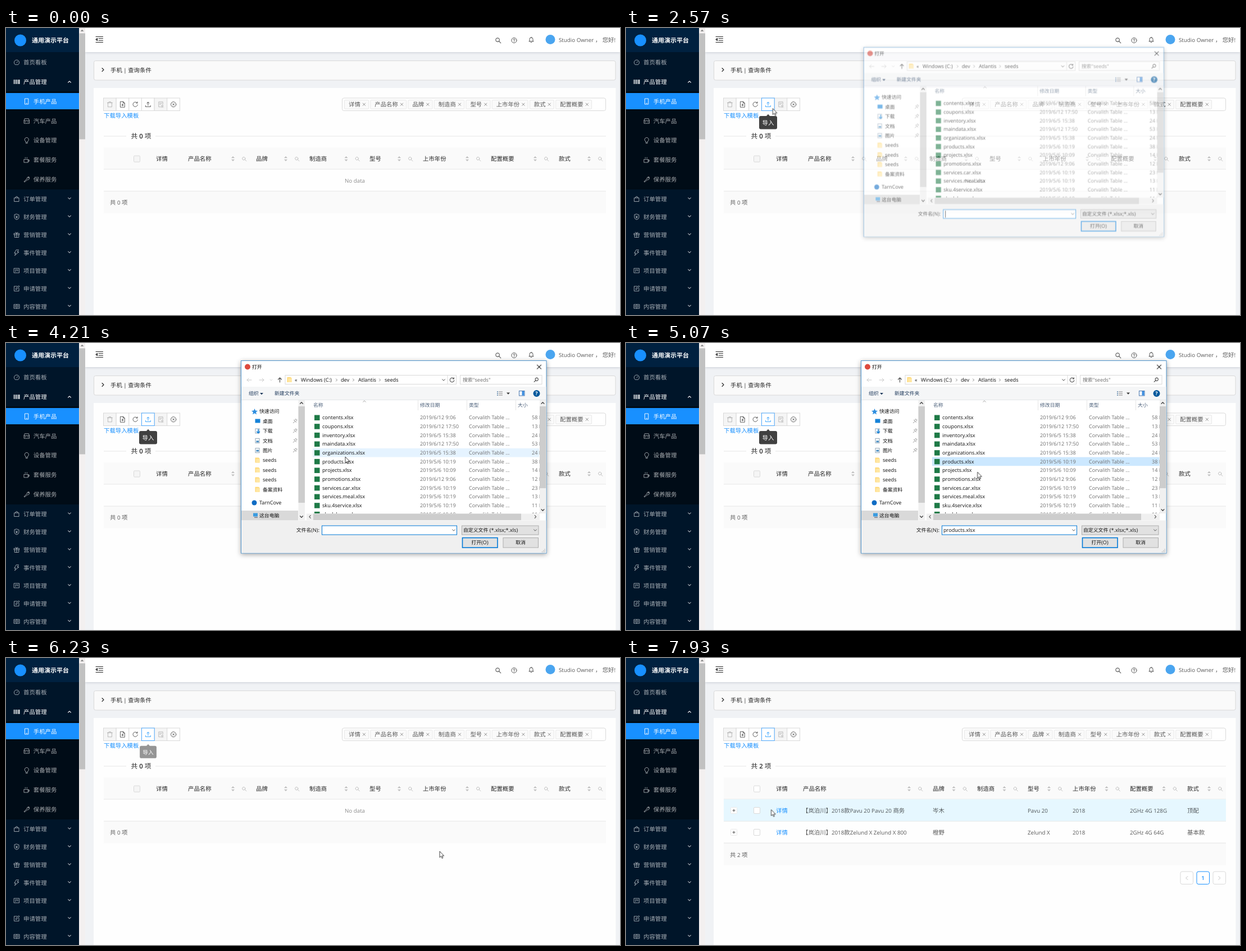
Animation of 1093 by 512 pixels, one loop 8000 ms. Source, as an HTML page:

```html
<!DOCTYPE html>
<html lang="zh">
<head>
<meta charset="utf-8">
<title>产品导入</title>
<style>
html, body { margin: 0; width: 100%; height: 100%; overflow: hidden; background: #f0f2f5; }
svg { display: block; }
text { white-space: pre; text-rendering: geometricPrecision;
  font-family: "Open Sans", "Noto Sans", "Noto Sans CJK SC", "Noto Sans CJK", sans-serif; }
.icon { fill: none; stroke-linejoin: round; stroke-linecap: round; }
.bar { filter: drop-shadow(0 1px 2px rgba(0,21,41,.16)); }
.win { filter: drop-shadow(0 2px 4px rgba(0,0,0,.35)); }

#arrow { animation: 8s ease-in-out infinite move, 8s step-end infinite pointer; }
#hand { animation: 8s step-end infinite hand; }
#lit { animation: 8s linear infinite lit; }
#tip { animation: 8s linear infinite tip; transform-box: fill-box; transform-origin: 50% 0; }
#dialog { animation: 8s linear infinite dialog; transform-box: fill-box; transform-origin: center; }
#expand { animation: 8s linear infinite expand; }
#hover { animation: 8s step-end infinite hover; }
#picked { animation: 8s step-end infinite picked; }
#caret { animation: 8s step-end infinite caret; }
#name { animation: 8s step-end infinite named; }
#marked { animation: 8s step-end infinite marked; }
#open { animation: 8s step-end infinite press; }
#app { animation: 8s step-end infinite app; }
#title { animation: 8s step-end infinite title; }
#empty { animation: 8s step-end infinite empty; }
#data { animation: 8s linear infinite data; }
#row1 { animation: 8s linear infinite row1; }
#row2 { animation: 8s linear infinite row2; }

@keyframes move {
  0%, .87% { transform: translate(990px, 496px); animation-timing-function: ease-out; }
  6.75%, 8.75% { transform: translate(479px, 321px); }
  19.4% { transform: translate(254px, 151px); }
  20.4%, 31% { transform: translate(250px, 143px); }
  39.9%, 40.9% { transform: translate(594px, 160px); }
  43.75% { transform: translate(588px, 147px); }
  46.9%, 47.9% { transform: translate(592px, 153px); animation-timing-function: linear; }
  52.6% { transform: translate(604px, 203px); }
  55.5%, 61.6% { transform: translate(598px, 211px); }
  68.75% { transform: translate(812px, 360px); }
  72.1%, 75.8% { transform: translate(846px, 353.5px); }
  83.5%, 87.4% { transform: translate(360.5px, 296.5px); }
  88.6%, 89.6% { transform: translate(361.5px, 296.5px); }
  94.4%, 95.5% { transform: translate(215px, 271px); }
  99.1%, 100% { transform: translate(258.5px, 270.5px); }
}
@keyframes pointer { 0% { opacity: 0 } .87% { opacity: 1 } 20.3% { opacity: 0 } 31% { opacity: 1 } 100% { opacity: 1 } }
@keyframes hand { 0% { opacity: 0 } 20.3% { opacity: 1 } 31%, 100% { opacity: 0 } }
@keyframes lit { 0%, 20.3% { opacity: 0 } 24%, 100% { opacity: 1 } }
@keyframes tip {
  0%, 21.75% { opacity: 0; transform: scale(.85) }
  24%, 77% { opacity: 1; transform: none }
  79%, 100% { opacity: 0; transform: scale(.85) }
}
@keyframes dialog {
  0%, 31% { opacity: 0; transform: scale(.96) }
  33%, 75.9% { opacity: 1; transform: none }
  77.8%, 100% { opacity: 0; transform: scale(.96) }
}
@keyframes expand { 0%, 35% { opacity: 0 } 37%, 48.7% { opacity: 1 } 52%, 100% { opacity: 0 } }
@keyframes hover {
  0% { opacity: 0; transform: translateY(31.34px) }
  38.4% { opacity: 1; transform: translateY(31.34px) }
  41.9% { opacity: 1; transform: translateY(15.67px) }
  48.9% { opacity: 1; transform: translateY(31.34px) }
  50% { opacity: 1; transform: translateY(47.01px) }
  51.4% { opacity: 1; transform: translateY(62.68px) }
  53.6% { opacity: 1; transform: translateY(78.35px) }
  58.3%, 100% { opacity: 0 }
}
@keyframes picked { 0% { fill: transparent } 58.3% { fill: #cce8ff } 73.1%, 100% { fill: #d9d9d9 } }
@keyframes caret {
  0% { opacity: 0 } 31% { opacity: 1 } 35.4% { opacity: 0 } 42% { opacity: 1 }
  48% { opacity: 0 } 54.6% { opacity: 1 } 58.3%, 100% { opacity: 0 }
}
@keyframes named { 0% { opacity: 0 } 58.3%, 100% { opacity: 1 } }
@keyframes marked { 0% { opacity: 0 } 73.1%, 100% { opacity: 1 } }
@keyframes press {
  0% { fill: #e1e1e1; stroke: #0078d7; stroke-width: 1.6 }
  71% { fill: #e5f1fb; stroke: #0078d7; stroke-width: 1 }
  73.1%, 100% { fill: #cce4f7; stroke: #005499; stroke-width: 1 }
}
@keyframes app { 0% { opacity: 1 } 75%, 100% { opacity: 0 } }
@keyframes title { 0% { transform: none } 75%, 100% { transform: translateX(-14px) } }
@keyframes empty { 0% { opacity: 1 } 80%, 100% { opacity: 0 } }
@keyframes data { 0%, 79.95% { opacity: 0 } 80% { opacity: .5 } 83%, 100% { opacity: 1 } }
@keyframes row1 { 0%, 91.7% { opacity: 0 } 95%, 100% { opacity: 1 } }
@keyframes row2 { 0%, 91.7% { opacity: 1 } 95%, 100% { opacity: 0 } }
</style>
</head>
<body>
<svg id="stage" width="1093" height="512" viewBox="0 0 1093 512"></svg>
<script>
const INK = 'rgba(0,0,0,.65)', DARK = 'rgba(0,0,0,.85)', PALE = 'rgba(0,0,0,.25)', BLUE = '#1890ff';

const ICONS = {
  dash: 'M-3 3.6A4.6 4.6 0 1 1 3 3.6ZM0 .5L2-2',
  bars: 'M-5-3.5V3.5M-3.4-3.5V3.5M-1.2-3.5V3.5M-.4-3.5V3.5M1.6-3.5V3.5M3.4-3.5V3.5M4.2-3.5V3.5M5-3.5V3.5',
  phone: 'M-3-5H3V5H-3ZM-.7 3.3H.7',
  car: 'M-4.7 4V-.5L-3.6-4H3.6L4.7-.5V4ZM-4.7-.5H4.7M-3 1.8H-1.8M1.8 1.8H3',
  bulb: 'M-1.8 3V1.6A3.6 3.6 0 1 1 1.8 1.6V3ZM-1.5 5H1.5',
  cup: 'M-4.5-1H2.5V4.5H-4.5ZM2.5 0H4.5V2.5H2.5M-2.5-4.5V-3M.5-4.5V-3',
  wrench: 'M-4.5 3.5L.5-1.2A3 3 0 0 1 4-4.6L2.2-2.4 4.6-3.8A3 3 0 0 1 1.2.5L-3.5 4.5Z',
  bag: 'M-4-2H4V4.5H-4ZM-2-2A2 2.6 0 0 1 2-2',
  shield: 'M0-5L4-3.6V1Q4 3.6 0 5Q-4 3.6-4 1V-3.6ZM-1.5-2L0 0 1.5-2M0 0V2.5M-1.5 .8H1.5',
  gift: 'M-4.5-2.5H4.5V0H-4.5ZM-3.8 0V4.5H3.8V0M0-2.5V4.5M0-2.5L-2-4.7M0-2.5L2-4.7',
  bolt: 'M-.5-5H3.5L1-1.3H4L-3.5 5-1.5 .8H-3.8Z',
  board: 'M-4.5-4H4.5V4H-4.5ZM-2-2V2M0-2V0M2-2V1',
  form: 'M1-4H-4.5V4.5H4V-.5M-1.5 1.5L-1-.8 3.8-5 5-3.8 .5 1Z',
  book: 'M0-3.5H-5V3.5H5V-3.5H0V3.5M-3.5-1.2H-1.5M-3.5 1H-1.5M1.5-1.2H3.5M1.5 1H3.5',
  search: 'M1.4 1.4L4.8 4.8M2.4-.8A3.3 3.3 0 1 1 2.4-.81',
  help: 'M4.6 0A4.6 4.6 0 1 1 4.6-.01M-1.4-1A1.4 1.4 0 1 1 .3 .2Q0 .4 0 1.2M0 2.4V2.6',
  bell: 'M-4 2.8H4M-3 2.8V-1A3 3 0 0 1 3-1V2.8M-1 4.4H1M0-4V-4.8',
  trash: 'M-4.5-3H4.5M-3.5-3V4.5H3.5V-3M-1.5-3V-4.7H1.5V-3',
  add: 'M-3.7-5H1L3.7-2.3V5H-3.7ZM-1.7 1H1.7M0-.8V2.8M1-5V-2.3H3.7',
  reload: 'M3.4-2.6A4.2 4.2 0 1 0 4.2 .6M3.8-4.6V-2.3H1.5',
  upload: 'M-4.5 2V4.2H4.5V2M0 2V-4M-2-2L0-4.3 2-2',
  audit: 'M3.7 0V-4.5H-3.7V4.5H0M-2-2H2M-2 0H0M4 2.5A1.4 1.4 0 1 1 4 2.49M1 4.8H4.5',
  stop: 'M4.6 0A4.6 4.6 0 1 1 4.6-.01M-1.6-1.6L1.6 1.6M1.6-1.6L-1.6 1.6',
  x: 'M-2.2-2.2L2.2 2.2M2.2-2.2L-2.2 2.2',
  down: 'M-2.4-1.2L0 1.2 2.4-1.2',
  up: 'M-2.4 1.2L0-1.2 2.4 1.2',
  right: 'M-1.5-3L1.5 0-1.5 3',
  left: 'M1.5-3L-1.5 0 1.5 3',
  fold: 'M-6-5H6.5M-1-1.7H6.5M-1 1.7H6.5M-6 5H6.5M-3.4-2L-6 0-3.4 2Z',
  arrowL: 'M4 0H-4M-1-3L-4 0-1 3', arrowR: 'M-4 0H4M1-3L4 0 1 3', arrowU: 'M0 4V-4M-3-1L0-4 3-1'
};

const icon = (k, x, y, c = INK, w = 1, s = 1) =>
  `<path class="icon" d="${ICONS[k]}" transform="translate(${x} ${y}) scale(${s})" stroke="${c}" stroke-width="${w}"/>`;
const rect = (x, y, w, h, fill, more = '') =>
  `<rect x="${x}" y="${y}" width="${w}" height="${h}" fill="${fill}" ${more}/>`;
const box = (x, y, w, h, fill, line, r = 0, more = '') =>
  rect(x + .5, y + .5, w - 1, h - 1, fill, `stroke="${line}" rx="${r}" ${more}`);
const dot = (x, y, r, c) => `<circle cx="${x}" cy="${y}" r="${r}" fill="${c}"/>`;
const tri = (x, y, c, up) => `<path fill="${c}" d="M${x - 3} ${y}h6l-3 ${up ? -3.2 : 3.2}z"/>`;
const group = (id, body) => `<g id="${id}">${body}</g>`;

// CJK and Latin runs get their own sizes, centred on y
function text(x, y, str, c = INK, cjk = 10.4, lat = cjk * .9375, more = '') {
  const runs = str.match(/[^\x00-\x7f]+|[\x00-\x7f]+/g)
    .map(r => `<tspan font-size="${r.charCodeAt(0) > 127 ? cjk : lat}">${r}</tspan>`).join('');
  return `<text x="${x}" y="${y + cjk * .37}" fill="${c}" ${more}>${runs}</text>`;
}
const small = (x, y, str, c = '#111', more = '') => text(x, y, str, c, 8.9, 9.15, more);
const MID = 'text-anchor="middle"';

function sidebar() {
  const grey = 'rgba(255,255,255,.65)', white = '#fff';
  let s = rect(0, 0, 130, 512, '#001529') + rect(0, 0, 130, 43, '#002140') + dot(25.5, 22, 10.5, BLUE) +
    text(46, 21.5, '通用演示平台', white, 11, 11, 'font-weight="700"') +
    rect(0, 113, 130, 175, '#000c17') + rect(0, 116, 130, 29, BLUE);
  const item = (k, y, label, c, dx = 0) => icon(k, 19 + dx, y, c, .9) + text(31 + dx, y, label, c);
  s += item('dash', 61.5, '首页看板', grey) + item('bars', 96, '产品管理', white) + icon('up', 113, 96, white, 1.2);
  [['phone', '手机产品'], ['car', '汽车产品'], ['bulb', '设备管理'], ['cup', '套餐服务'], ['wrench', '保养服务']]
    .forEach(([k, n], i) => s += item(k, 131 + i * 34.8, n, i ? grey : white, 17.8));
  [['bag', '订单'], ['shield', '财务'], ['gift', '营销'], ['bolt', '事件'], ['board', '项目'], ['form', '申请'], ['book', '内容']]
    .forEach(([k, n], i) => {
      const y = 305 + i * 31.95;
      s += item(k, y, n + '管理', grey) + icon('down', 113, y - 1, grey, 1.1);
    });
  return s + rect(130, 0, 11, 512, '#f3f0f0') + rect(130.5, 9.5, 10.5, 189, '#c1c1c1') + tri(135.5, 6, '#8a8a8a', true);
}

function page() {
  let s = rect(141, 0, 952, 512, '#f0f2f5') + rect(141, 0, 952, 43, '#fff', 'class="bar"') +
    icon('fold', 166, 20.5, DARK, 1.1) + icon('search', 876, 22, INK, 1.1) + icon('help', 904.5, 22, INK) +
    icon('bell', 935, 21, INK) + dot(969, 20.5, 8.5, '#4aa5f0') + text(984, 21, 'Studio Owner ， 您好!');
  s += box(156, 58, 929.5, 35.5, '#fafafa', '#d9d9d9', 3) + icon('right', 172.5, 74.5, DARK, 1.1) +
    text(186, 75.5, '手机 | 查询条件', DARK) + rect(156, 107, 929.5, 405, '#fefefe');

  ['trash', 'add', 'reload', 'upload', 'audit', 'stop'].forEach((k, i) => {
    const off = i % 4 === 0, x = 173.5 + i * 22.65;
    s += rect(x, 125, 22.65, 22.5, off ? '#f5f5f5' : '#fff', 'stroke="#d9d9d9"') +
      icon(k, x + 11.4, 136.3, off ? PALE : INK, .95);
  });
  s += group('lit', rect(241.5, 125, 22.65, 22.5, '#fff', `stroke="${BLUE}" stroke-opacity=".75"`) +
    icon('upload', 252.9, 136.3, '#40a9ff', 1)) + text(174, 156, '下载导入模板', BLUE);

  s += box(598, 124.5, 470, 23.5, '#fff', '#d9d9d9', 3);
  let x = 602;
  for (const n of ['详情', '产品名称', '品牌', '制造商', '型号', '上市年份', '款式', '配置概要']) {
    const w = n.length * 10.4 + 23.4;
    s += box(x, 128, w, 17, '#fafafa', '#e8e8e8', 1.5) + text(x + 8, 136.5, n) + icon('x', x + w - 8.8, 136.3, 'rgba(0,0,0,.45)', .9);
    x += w + 2.1;
  }
  return s + rect(174, 192.5, 40, 1, '#e8e8e8') + rect(266, 192.5, 802, 1, '#e8e8e8');
}

const HEADS = ['产品名称', '品牌', '制造商', '型号', '上市年份', '配置概要', '款式'];
const check = (y, fill = '#fff') => box(227, y, 12, 12, fill, '#d9d9d9', 1.5);

// cols: label position and sorter position of each column
function table(count, cols, rows) {
  let s = `<text x="222.5" y="197.3" fill="${DARK}" font-size="11.7">共 <tspan font-weight="600" font-size="11.3">${count}</tspan> 项</text>` +
    rect(174, 213, 894, 39, '#fafafa') + rect(174, 251.5, 894, 1, '#e8e8e8') +
    check(227.5, count ? '#fff' : '#f5f5f5') + text(267, 233, '详情', DARK);
  cols.forEach(([x, sort], i) => s += text(x, 233, HEADS[i], DARK) + tri(sort, 232, '#bfbfbf', true) +
    tri(sort, 234.5, '#bfbfbf') + icon('search', sort + 20, 233.5, '#b5b5b5', 1.1, .8));
  const end = 252 + Math.max(1, count) * 39.1;
  return s + rows + rect(174, end, 894, 39.3, '#fafafa') + rect(174, end - .5, 894, 1, '#e8e8e8') +
    text(185, end + 20.5, `共 ${count} 项`);
}

function emptyTable() {
  return table(0, [[324, 404], [445, 498], [540, 605.5], [647, 700], [742, 821], [863, 942], [984, 1038]],
    text(621, 272, 'No data', 'rgba(0,0,0,.45)', 10.4, 9.75, MID));
}

function dataTable() {
  const cols = [[315, 504], [546, 583.5], [625, 673.5], [715, 753], [795, 855.5], [897, 957.5], [999, 1038]];
  const items = [
    ['【岚泊川】2018款Pavu 20 Pavu 20 商务', '岑木', '', 'Pavu 20', '2018', '2GHz 4G 128G', '顶配'],
    ['【岚泊川】2018款Zelund X Zelund X 800', '橙野', '', 'Zelund X', '2018', '2GHz 4G 64G', '基本款']];
  let rows = '';
  items.forEach((cells, i) => {
    const y = 272 + i * 39;
    rows += rect(174, y - 20, 894, 39.2, '#e6f7ff', `id="row${i + 1}"`) + rect(174, y + 18.7, 894, 1, '#e8e8e8') +
      box(186, y - 6, 12, 12, '#fff', '#e8e8e8', 1) + `<path d="M189.5 ${y}h5m-2.5-2.5v5" stroke="#555"/>` +
      check(y - 6) + text(267, y, '详情', BLUE);
    cells.forEach((v, j) => { if (v) rows += text(cols[j][0] - (j ? 0 : 1), y, v); });
  });
  let s = rect(174, 180, 92, 26, '#fefefe') + rect(174, 192.5, 40, 1, '#e8e8e8') + table(2, cols, rows);
  [987, 1016, 1045].forEach((x, i) => {
    s += box(x - .5, 380.5, 23.5, 23.5, '#fff', i === 1 ? BLUE : '#d9d9d9', 3);
    s += i === 1 ? text(x + 11, 392, '1', BLUE, 10.4, 9.75, MID + ' font-weight="600"')
      : icon(i ? 'right' : 'left', x + 11.3, 392.5, PALE, 1);
  });
  return s;
}

const folder = (x, y) => `<path fill="#ffd978" d="M${x - 4} ${y - 4.5}h6l2 1.5v7.5h-8z"/>` + rect(x - 2.5, y - 2.5, 6.5, 7, '#ffe7a3');

function tree() {
  let s = rect(419, 299, 101, 17.5, '#d9d9d9') +
    '<path fill="#2f8fe0" d="M442.500 117l1.500 3.500 4 .4-3 2.600 1 4-3.500-2.200-3.500 2.200 1-4-3-2.600 4-.4z"/>' + small(451, 122, '快速访问');
  ['桌面', '下载', '文档', '图片', 'seeds', 'seeds', 'seeds', '备案资料'].forEach((n, i) => {
    const y = 139.5 + i * 17.4;
    if (i > 3) s += folder(447.5, y);
    else {
      s += i ? box(443.5, y - 4.5, 8, 9, '#fff', '#8fa3b5') : rect(443.5, y - 4, 9, 7, '#1683d8');
      if (i) s += i === 1 ? icon('arrowU', 449, y + .5, '#1683d8', 2, -.8) : rect(445.5, y - (i - 2), 4.5, 3, '#4a90c4');
      s += `<path d="M511.500 ${y + 3}l2-2m-1-3l4 4m-2.500-4l2-2 2 2-2 2" class="icon" stroke="#888"/>`;
    }
    s += small(457, y, n);
  });
  s += dot(442, 285, 4.5, '#0f6cc4') + small(451, 285, 'TarnCove') +
    rect(440, 303.5, 8, 6, '#3a9be0') + rect(442, 310.5, 6, 1.2, '#667') + small(451, 308, '这台电脑') +
    group('expand', icon('down', 427, 122, '#aaa') + icon('right', 427, 285, '#aaa', 1, .8) + icon('right', 427, 308, '#888', 1, .8));
  return s + rect(520.5, 102, 11.5, 214, '#f0f0f0') + rect(520.5, 113, 11.5, 172, '#cdcdcd') +
    icon('up', 526, 107, '#444', 1.3) + icon('down', 526, 310, '#444', 1.3);
}

function fileList() {
  const names = ['contents', 'coupons', 'inventory', 'maindata', 'organizations', 'products', 'projects', 'promotions',
    'services.car', 'services.meal', 'sku.4service', 'sku.labour'];
  const a = '6/12 9:06', b = '6/12 17:50', c = '6/5 15:38', d = '5/6 10:19';
  const dates = [a, b, c, b, c, d, '5/6 10:09', a, d, d, d, d];
  const sizes = [58, 13, 24, 53, 24, 38, 14, 12, 23, 13, 11, 11];
  let s = icon('up', 638, 104, '#888', .8);
  ['名称', '修改日期', '类型', '大小'].forEach((n, i) => {
    const x = i ? 650 + i * 87 : 547;
    s += small(x, 111, n, '#4c607a');
    if (i) s += rect(x - 4, 102, 1, 18, '#e5e5e5');
  });
  let rows = rect(546, 125.2, 403, 15.6, '#e5f3ff', 'id="hover"') + rect(545, 203.6, 404.5, 15.6, 'transparent', 'id="picked"');
  names.forEach((n, i) => {
    const y = 133 + i * 15.67;
    rows += rect(549, y - 4.5, 9.5, 9.5, '#1f7a47') + small(563, y, n + '.xlsx') + small(737, y, '2019/' + dates[i], '#6d6d6d') +
      small(824, y, 'Corvalith Table ...', '#6d6d6d') + small(936, y, sizes[i] + ' KB', '#6d6d6d');
  });
  s += `<clipPath id="view"><rect x="534" y="120" width="416" height="184"/></clipPath><g clip-path="url(#view)">${rows}</g>`;
  return s + rect(950, 102, 11.5, 202, '#f0f0f0') + rect(950, 113, 11.5, 146, '#cdcdcd') +
    icon('up', 955.5, 107, '#444', 1.3) + icon('down', 955.5, 298, '#444', 1.3) +
    rect(535, 304.5, 415, 11.5, '#f0f0f0') + rect(547, 304.5, 370, 11.5, '#cdcdcd') +
    icon('left', 541, 310, '#444', 1.3, .8) + icon('right', 942.5, 310, '#444', 1.3, .8);
}

function dialog() {
  let s = rect(418.5, 31.5, 543.5, 343.5, '#fff', 'class="win" stroke="#4f94cd"') +
    group('app', dot(430, 42.5, 5, '#dd4b3e')) + group('title', small(438, 42.5, '打开', '#000')) + icon('x', 949, 42.5, '#222', .7, 1.6);
  s += icon('arrowL', 433, 66, '#c8c8c8') + icon('arrowR', 455, 66, '#c8c8c8') + icon('down', 472, 66, '#c8c8c8', 1, .8) +
    icon('arrowU', 487.5, 66, '#555', 1.2) + box(496.5, 57, 305.5, 17, '#fff', '#d9d9d9') + folder(504.5, 65.5);
  [[514, '«'], [525, 'Windows (C:)'], [596, 'dev'], [627, 'Atlantis'], [674, 'seeds']].forEach(([x, n]) => s += small(x, 65.5, n));
  [588.5, 618.5, 665.5].forEach(x => s += icon('right', x, 66, '#555', 1, .7));
  s += icon('down', 779, 66, '#444') + rect(785.5, 58, 1, 15, '#d9d9d9') + icon('reload', 794, 66, '#555', 1.2, .9) +
    box(808, 57, 146.5, 17, '#fff', '#d9d9d9') + small(813, 65.5, '搜索"seeds"', '#6d6d6d') +
    `<g transform="translate(944 65.500) scale(-.8 .8)">${icon('search', 0, 0, '#444', 1.4)}</g>`;
  s += rect(419, 78, 542.5, 23, '#f5f6f7') + rect(419, 101, 542.5, 1, '#e3e6e8') + small(432, 90, '组织', '#1e395b') +
    tri(455, 89, '#1e395b') + small(478, 90, '新建文件夹', '#1e395b') + tri(894, 88.5, '#333');
  for (let i = 0; i < 3; i++) s += rect(874, 86 + i * 3, 2, 2, '#7d9bb8') + rect(877, 86.5 + i * 3, 7, 1, '#888');
  s += box(913, 85, 10.5, 9.5, '#fff', '#4a78b0') + rect(918.5, 86, 4, 7.5, '#3d8ee0') +
    dot(944.5, 90, 6, '#00589c') + text(944.5, 90, '?', '#fff', 9, 9, MID + ' font-weight="700"');
  s += tree() + fileList() + rect(419, 316.5, 542.5, 58, '#f0f0f0');
  s += small(558, 334, '文件名(N):', '#111', 'text-anchor="end"') + box(562, 325.5, 241, 17, '#fff', '#0078d7') +
    icon('down', 797, 334, '#555') + rect(566, 328, 1, 12.5, '#111', 'id="caret"') +
    group('name', small(565, 334, 'products.xlsx')) +
    group('marked', rect(564.5, 328, 57.5, 12.5, '#0078d7') + small(565, 334, 'products.xlsx', '#fff'));
  s += box(811, 325.5, 137.5, 17, '#e1e1e1', '#adadad') + small(814, 334, '自定义文件 (*.xlsx;*.xls)') + icon('down', 942, 334, '#555') +
    box(812, 347, 63.5, 18.5, '#e1e1e1', '#0078d7', 0, 'id="open"') + small(843.5, 356, '打开(O)', '#111', MID) +
    box(884.5, 347, 63.5, 18.5, '#e1e1e1', '#adadad') + small(916, 356, '取消', '#111', MID);
  for (let i = 0; i < 6; i++) {
    const r = i < 1 ? 0 : i < 3 ? 1 : 2, k = i - r * (r + 1) / 2;
    s += rect(958.5 - k * 2.3, 367.5 + r * 2.3, 1.2, 1.2, '#a8a8a8');
  }
  return s;
}

const tip = '<g fill="#404040"><path d="M249.500 157.500l3.500-3.800 3.500 3.800z"/><rect x="237" y="157" width="32" height="23.500" rx="3"/></g>' +
  text(253, 169, '导入', '#fff', 10.4, 10, MID);
const arrow = '<path d="M0 0V11L2.500 8.700 4.200 12.500 5.900 11.800 4.200 8.100H7.700Z" fill="#fff" stroke="#111" stroke-width=".8"/>';
const hand = '<path d="M248.800 150V143.500q0-1.500 1.200-1.500t1.200 1.500v3.700q3.200-.2 5 1.200v3.500q0 1.500-1.200 3.600h-5q-1-2.500-3-4.600-.7-1.600.4-1.700z" ' +
  'fill="#fff" stroke="#111" stroke-width=".9"/>';

document.getElementById('stage').innerHTML = page() + group('empty', emptyTable()) + group('data', dataTable()) +
  sidebar() + group('tip', tip) + group('dialog', dialog()) + group('hand', hand) + group('arrow', arrow);
</script>
</body>
</html>
```
